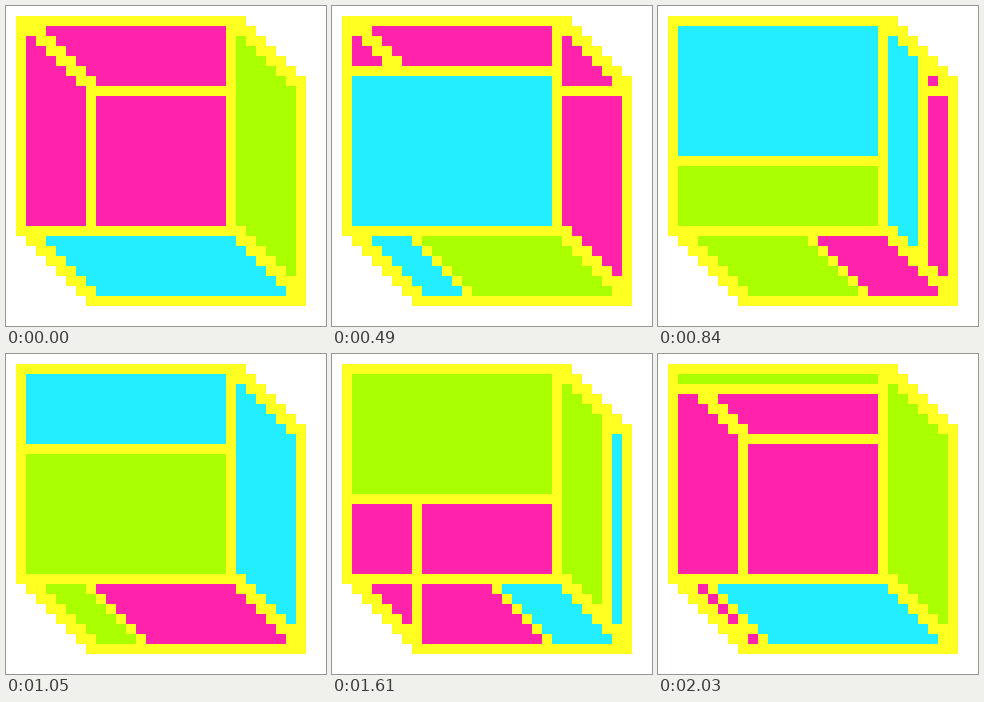
Write an HTML page with a canvas that moves like this. It is 320 px wide and 320 px high and loops after 2.1 s.

```html
<!DOCTYPE html>
<html>
<head>
<meta charset="utf-8">
<style>
html, body { margin: 0; width: 100%; height: 100%; overflow: hidden; background: #fff; }
canvas { display: block; }
</style>
</head>
<body>
<canvas width="320" height="320"></canvas>
<script>
const ctx = document.querySelector('canvas').getContext('2d');
const CELL = 10, STEP = 70, STEPS = 30;
const YELLOW = '#ffff22', PINK = '#ff22aa', CYAN = '#22eeff', LIME = '#aaff00';
const COLORS = [PINK, CYAN, LIME];

// Each turn passes the colours on; keys are [step in turn, position of the dividing line].
const TURNS = [
  { start: 0, front: [[0, 22], [1, 19], [4, 13], [9, 1]], right: [[0, 22], [7, 29]], bottom: [[0, 23], [4, 15], [9, 3]] },
  { start: 9, front: [[0, 22], [1, 19], [10, 1]], right: [[0, 22], [1, 24], [6, 29]], bottom: [[0, 23], [1, 20], [6, 8], [9, 3]] },
  { start: 19, front: [[0, 22], [11, 1]], right: [[0, 22], [1, 24], [6, 29]], bottom: [[0, 23], [11, 3]] }
];

function lineAt(keys, k) {
  const i = keys.findIndex(key => key[0] >= k);
  if (i < 0) return keys[keys.length - 1][1];
  if (i === 0) return keys[0][1];
  const [k0, p0] = keys[i - 1], [k1, p1] = keys[i];
  return Math.round(p0 + (p1 - p0) * (k - k0) / (k1 - k0));
}

const between = (v, a, b) => v >= a && v <= b;
const onBackEdge = (x, y) =>
  (x === 8 && y >= 8) || (y === 8 && x >= 8) || (y < 8 && (x === y || x === y + 1));

function draw(step) {
  const turn = TURNS.findLastIndex(t => step >= t.start);
  const { start, ...keys } = TURNS[turn];
  const front = lineAt(keys.front, step - start);
  const right = lineAt(keys.right, step - start);
  const bottom = lineAt(keys.bottom, step - start);

  // side > 0: incoming colour, side < 0: outgoing colour, 0: dividing line
  function panel(x, y, side, shift) {
    if (side === 0) return YELLOW;
    const color = COLORS[(turn + shift + (side > 0 ? 1 : 0)) % 3];
    return color === PINK && onBackEdge(x, y) ? YELLOW : color;
  }

  function cellColor(x, y) {
    if (between(x, 2, 21) && between(y, 2, 21)) return panel(x, y, y - front, 0);
    if (between(x, 23, 28) && between(y, x - 20, x - 2)) return panel(x, y, right - x, 2);
    if (between(y, 23, 28) && between(x, y - 19, y - 1)) return panel(x, y, x - y + 23 - bottom, 1);
    return between(x - y, -21, 22) ? YELLOW : null;
  }

  ctx.fillStyle = '#fff';
  ctx.fillRect(0, 0, 320, 320);
  for (let y = 1; y < 30; y++) {
    for (let x = 1; x < 30; x++) {
      const color = cellColor(x, y);
      if (!color) continue;
      ctx.fillStyle = color;
      ctx.fillRect(x * CELL, y * CELL, CELL, CELL);
    }
  }
}

function tick() {
  draw(Math.floor((performance.now() - began) / STEP) % STEPS);
  requestAnimationFrame(tick);
}
const began = performance.now();
tick();
</script>
</body>
</html>
```
